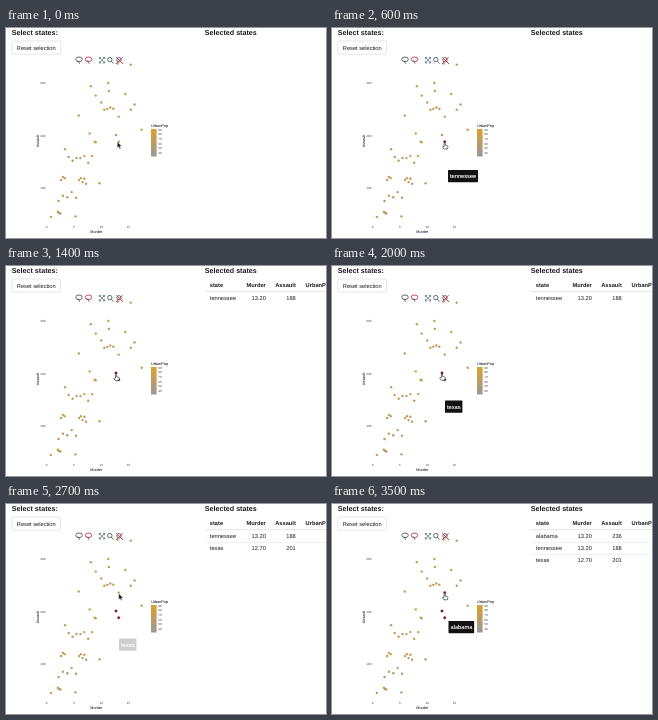
Animation, 320 px wide and 210 px high, one loop 3.8 s. Source, as an HTML page:

```html
<!DOCTYPE html>
<html lang="en">
<head>
<meta charset="utf-8">
<title>Selected states</title>
<style>
  html, body { margin: 0; width: 100%; height: 100%; overflow: hidden; background: #fff; }
  svg { display: block; width: 100%; height: 100%; }
  text { font: 5.7px "Liberation Sans", Arial, sans-serif; fill: #1c1c1c; text-rendering: geometricPrecision; }
  .head { font-size: 7.15px; font-weight: bold; }
  .th { font-weight: bold; }
  .end { text-anchor: end; }
  .mid { text-anchor: middle; }
  .title { font-size: 3.8px; fill: #000; }
  .tick { font-size: 3.04px; fill: #3a3a3a; }
  .picked { fill: #96163a; stroke: #3c0a1c; stroke-width: .35; }
  .icon { fill: none; stroke: #46525a; stroke-width: .85; }
  .icon .red { stroke: #c22d45; }
  #tip text { fill: #fff; stroke: #fff; stroke-width: .12; }
</style>
</head>
<body>
<svg viewBox="0 0 320 210" preserveAspectRatio="none">
  <defs>
    <linearGradient id="ramp" x2="0" y2="1">
      <stop stop-color="#dda02e"/><stop offset="1" stop-color="#999"/>
    </linearGradient>
    <path id="tail" d="M71.4 33.2q1.5-.5 1.5 .9t1 1.6"/>
    <ellipse id="loop" cx="73" cy="31.3" rx="3.3" ry="2.3"/>
    <g id="lens"><circle r="2.2"/><path d="M1.6 1.6l2.3 2.4"/></g>
  </defs>

  <text class="head" x="5.8" y="7.3">Select states:</text>
  <text class="head" x="198.8" y="7.3">Selected states</text>
  <rect x="5.8" y="13" width="48.8" height="13.2" rx="1.6" fill="#fff" stroke="#ccc" stroke-width=".5"/>
  <text x="10.8" y="21.6">Reset selection</text>

  <g id="plot">
    <text class="title mid" x="90.3" y="204.8">Murder</text>
    <text class="title mid" transform="translate(32.8 113) rotate(-90)">Assault</text>
    <text class="title" x="145" y="99.2">UrbanPop</text>
    <rect x="145" y="101" width="5.6" height="27.5" fill="url(#ramp)"/>
  </g>

  <g class="icon">
    <use href="#loop"/><use href="#tail"/>
    <use href="#loop" x="9.5" class="red"/><use href="#tail" x="9.5"/>
    <path stroke="#5b7b80" d="M93.4 31.2v-1.8h1.8M96.8 29.4h1.8v1.8M98.6 33.2v1.8h-1.8M95.2 35h-1.8v-1.8M93.5 29.5l5 5.4M98.5 29.5l-5 5.4"/>
    <use href="#lens" x="103.8" y="31.6"/>
    <use href="#lens" x="113" y="31.8"/>
    <path class="red" d="M110.2 29.2l6.6 6.6M116.6 29.2l-6.4 6.6"/>
  </g>

  <g id="table"></g>

  <g id="tip">
    <rect height="12.2" rx=".6" fill="#000"/>
    <text x="2" y="8.1"></text>
  </g>
  <g id="cursor">
    <path id="arrow" d="M0 0V6.1L1.4 4.9L2.4 7.1L3.4 6.6L2.5 4.5H4.4Z" fill="#111" stroke="#fff" stroke-width=".4"/>
    <path id="hand" d="M-.6 .6Q0-.4 .6 .6V2.7L2.6 3.1Q3.4 3.5 3.1 4.7L2.6 6.4H-.8L-2.3 4.4Q-2.2 3.4-.6 4Z" fill="#fff" stroke="#222" stroke-width=".65"/>
  </g>
</svg>
<script>
const LOOP = 3800, STEP = 100;
const $ = id => document.getElementById(id);

function add(parent, tag, attrs, text) {
  const el = document.createElementNS("http://www.w3.org/2000/svg", tag);
  for (const k in attrs) el.setAttribute(k, attrs[k]);
  if (text !== undefined) el.textContent = text;
  return parent.appendChild(el);
}

let seed = 7;
const random = () => (seed = seed * 16807 % 2147483647) / 2147483647;
const clamp = u => Math.max(0, Math.min(1, u));

const px = murder => 40.5 + murder * 5.47;
const py = assault => 212.5 - assault * .525;
const plot = $("plot");

function dot(murder, assault) {
  const mix = Math.round(35 + random() * 65);
  return add(plot, "circle", {
    cx: px(murder), cy: py(assault), r: 1.2,
    fill: `color-mix(in srgb, #d69c38 ${mix}%, #999)`
  });
}

// count points spread evenly across murder, jittered in assault
function cluster(count, murder, assault, wide, tall) {
  for (let k = 0; k < count; k++) {
    const side = (2 * k + 1) / count - 1;
    dot(murder + side * wide, assault + (random() * 2 - 1) * tall);
  }
}

cluster(4, 11.4, 252, 1.1, 3);
cluster(2, 8.9, 184, .2, 8);
cluster(7, 6.2, 154, 2.5, 8);
cluster(5, 6.6, 113, .8, 7);
cluster(3, 3, 116, .5, 6);
cluster(5, 3.8, 84, 2, 10);
cluster(4, 2.3, 53, .3, 5);

const outliers = [
  [15.4, 335], [13, 337], [17.4, 211], [16.1, 259], [14.4, 279], [15.4, 249],
  [11.3, 300], [11.4, 285], [8.1, 294], [9, 276], [10, 263], [5.9, 238],
  [7.9, 204], [3.4, 174], [9.7, 109], [5.3, 46], [.8, 45]
];
for (const [m, a] of outliers) dot(m, a);

for (let m = 0; m <= 15; m += 5) add(plot, "text", { class: "tick mid", x: px(m), y: 200.2 }, m);
for (let a = 100; a <= 300; a += 100) add(plot, "text", { class: "tick end", x: 39.4, y: py(a) + 1.1 }, a);
for (let u = 40; u <= 90; u += 10)
  add(plot, "text", { class: "tick", x: 152.3, y: 144.5 - u * .466 }, u);

// go/dur: cursor travel; lit/leave: hover; listed: row enters the table
const visits = [
  { name: "tennessee", murder: 13.2, assault: 188, go: 0, dur: 300, lit: 100, listed: 1200, leave: 1300, tip: [116, 142] },
  { name: "texas", murder: 12.7, assault: 201, go: 1200, dur: 400, lit: 1400, listed: 2200, leave: 2300, tip: [113, 134.6] },
  { name: "alabama", murder: 13.2, assault: 236, go: 2200, dur: 700, lit: 2900, listed: 3500, leave: LOOP, tip: [116.5, 117] }
];
for (const v of visits) {
  v.dot = dot(v.murder, v.assault);
  v.x = px(v.murder);
  v.y = py(v.assault) + .8;
}

let shown = "";
function drawTable(t) {
  const rows = visits.filter(v => t >= v.listed).sort((a, b) => a.name < b.name ? -1 : 1);
  const key = rows.map(v => v.name).join();
  if (key === shown) return;
  shown = key;
  const table = $("table");
  table.replaceChildren();
  if (!rows.length) return;
  const line = (y, h, fill) => add(table, "rect", { x: 199, y, width: 121, height: h, fill });
  const cell = (x, y, cls, text) => add(table, "text", { x, y, class: cls }, text);
  cell(203.8, 21.1, "th", "state");
  cell(259.8, 21.1, "th end", "Murder");
  cell(289.8, 21.1, "th end", "Assault");
  cell(299.6, 21.1, "th", "UrbanPop");
  line(25.3, .8, "#ddd");
  rows.forEach((v, n) => {
    const y = 33.5 + n * 12.4;
    if (n) line(y - 7.7, .4, "#ddd");
    cell(203.8, y, "", v.name);
    cell(259.8, y, "end", v.murder.toFixed(2));
    cell(289.8, y, "end", v.assault);
  });
}

const tip = $("tip"), box = tip.querySelector("rect"), label = tip.querySelector("text");

function drawTip(t) {
  const v = visits.findLast(v => t >= v.lit) || visits[0];
  const rise = clamp((t - v.lit) / 200) ** 1.4;
  const fall = clamp((t - v.leave) / 500);
  label.textContent = v.name;
  box.setAttribute("width", label.getComputedTextLength() + 3.8);
  tip.setAttribute("transform", `translate(${v.tip})`);
  tip.setAttribute("opacity", .93 * rise * (1 - fall));
}

function drawCursor(t) {
  let x = 111.3, y = 113.8;
  for (const v of visits) {
    const ease = 1 - (1 - clamp((t - v.go) / v.dur)) ** 4;
    x += (v.x - x) * ease;
    y += (v.y - y) * ease;
  }
  const over = visits.some(v => t >= v.lit && t < v.leave);
  $("cursor").setAttribute("transform", `translate(${x} ${y})`);
  $("hand").setAttribute("opacity", over ? 1 : 0);
  $("arrow").setAttribute("opacity", over ? 0 : 1);
}

function draw(ms) {
  const t = Math.floor(ms % LOOP / STEP) * STEP;
  for (const v of visits) v.dot.classList.toggle("picked", t >= v.lit);
  drawTable(t);
  drawTip(t);
  drawCursor(t);
}

const start = performance.now();
function tick() {
  draw(performance.now() - start);
  requestAnimationFrame(tick);
}
tick();
</script>
</body>
</html>
```
